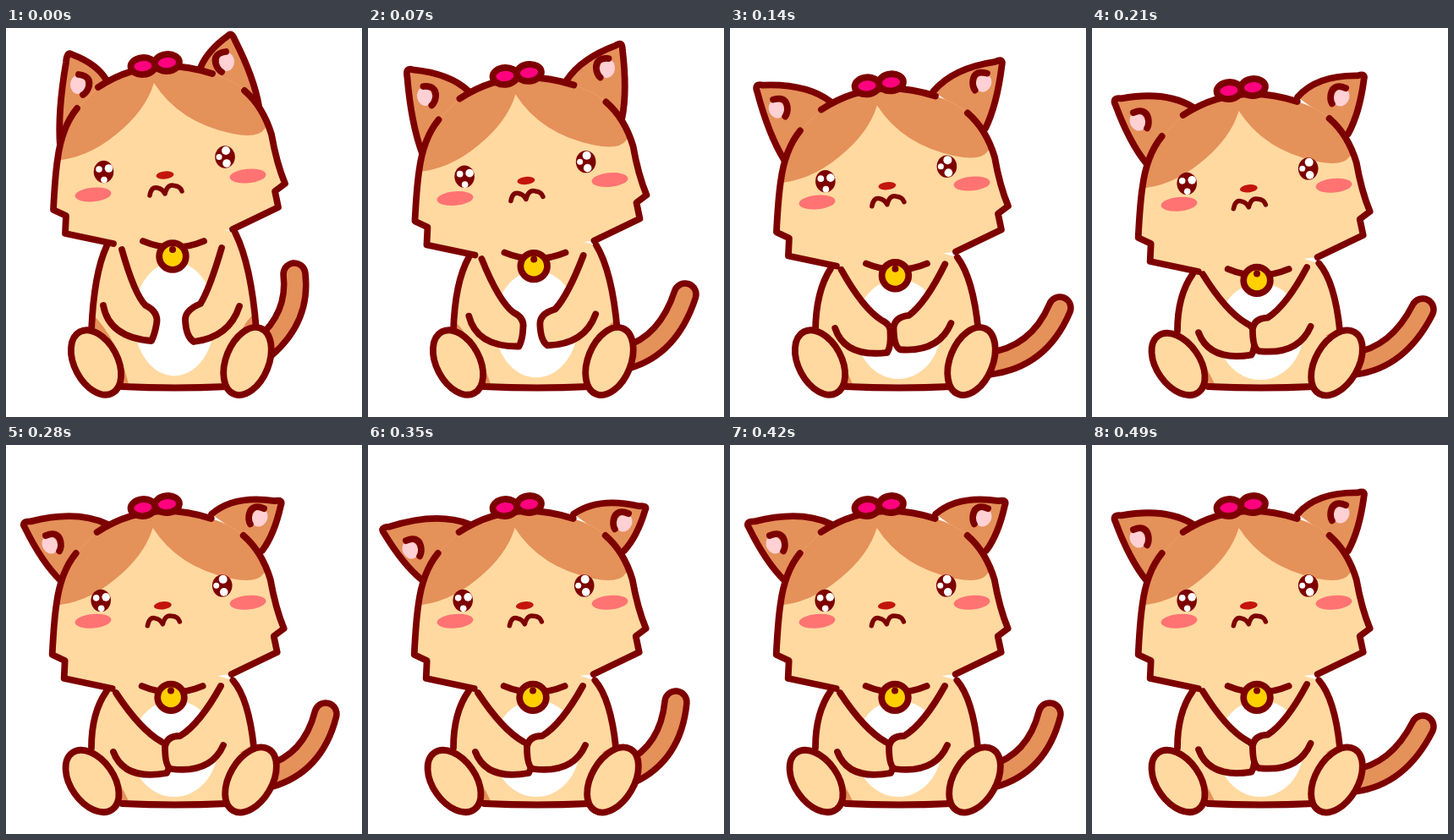
An HTML page with a canvas that plays this animation: 421 by 460 pixels, repeating every 560 ms.

```html
<!DOCTYPE html>
<html lang="en">
<head>
<meta charset="utf-8">
<title>Shy kitten</title>
<style>
  html, body { margin: 0; width: 100%; height: 100%; overflow: hidden; background: #fff; }
  canvas { display: block; }
</style>
</head>
<body>
<canvas id="stage" width="421" height="460"></canvas>
<script>
const ctx = document.getElementById('stage').getContext('2d');
const LINE = '#7d0000', SKIN = '#ffd9a0', BROWN = '#e5915a', WHITE = '#fff';
const BLUSH = '#ff7373', EAR_PINK = '#ffd0d4', BOW = '#ff007f', GOLD = '#ffd000', NOSE = '#c4140c';
const STEP = 70, PEN = 7.8;

// drop: head lowering, hug: arms closing, lean: feet turning outwards
const rest = { drop: 0, hug: 0, lean: 0, tail: [305, 378, 347, 342, 341, 291],
  earL: [72, 27], pinkL: [85, 67], earR: [267, 4], pinkR: [261, 40] };
const sink = { drop: 13.5, hug: .36, lean: 0, tail: [305, 390, 355, 376, 375, 315],
  earL: [44, 46], pinkL: [67, 81], earR: [301, 15], pinkR: [283, 48] };
const low = { drop: 26.5, hug: .77, lean: 0, tail: [305, 397, 365, 390, 390, 331],
  earL: [28, 65], pinkL: [55, 96], earR: [324, 35], pinkR: [300, 65] };
const curl = { drop: 33, hug: .92, lean: 1, tail: [310, 397, 362, 390, 391, 333],
  earL: [23, 82], pinkL: [54, 111], earR: [324, 53], pinkR: [295, 82] };
const hold = { drop: 33, hug: 1, lean: 1, tail: [310, 392, 363, 377, 378, 318],
  earL: [17, 90], pinkL: [52, 118], earR: [328, 64], pinkR: [300, 86] };
const tuck = { ...hold, tail: [310, 387, 358, 364, 364, 304],
  earL: [13, 97], pinkL: [50, 124], earR: [331, 71], pinkR: [303, 92] };
const poses = [rest, sink, low, curl, hold, tuck, hold, curl];

const arms = {
  left: {
    open: [137, 262, 152, 315, 165, 328, 181, 336, 178, 350, 176, 362, 172, 370, 122, 366, 115, 328],
    shut: [130, 293, 159, 337, 184, 351, 193, 355, 193, 363, 195, 381, 190, 388, 140, 397, 127, 363]
  },
  right: {
    open: [255, 260, 241, 308, 230, 326, 211, 334, 212, 346, 213, 365, 222, 371, 264, 366, 276, 329],
    shut: [254, 285, 229, 330, 206, 344, 190, 344, 188, 357, 188, 380, 195, 383, 242, 389, 257, 355]
  }
};

const headLeft = 'M84 95Q66 117 61 155Q58 175 56 215L71 222L70 243L127 255';
const headRight = 'M282 74Q304 93 314 126Q320 160 330 184L318 193L322 212L268 238';
const headTop = 'M109 70Q170 30 244 54';
const headFill = headLeft + 'L268 238L322 212L318 193L330 184Q320 160 314 126Q304 93 282 74Q267 61 244 54Q170 30 109 70Z';
const hair = 'M175 65Q165 98 130 126Q95 155 55 157V20H330V100L306 119Q298 131 268 125Q205 112 175 65Z';
const mouth = 'M170 198Q172 187 179 189Q185 190 188 196Q191 184 199 186.5Q206 187 208 193';

const mix = (a, b, t) => a + (b - a) * t;

function shape(d, fill, width = PEN) {
  const path = new Path2D(d);
  if (fill) { ctx.fillStyle = fill; ctx.fill(path); }
  if (width) { ctx.lineWidth = width; ctx.strokeStyle = LINE; ctx.stroke(path); }
}

function oval(x, y, rx, ry, fill, width = 0, degrees = 0) {
  ctx.beginPath();
  ctx.ellipse(x, y, rx, ry, degrees * Math.PI / 180, 0, 2 * Math.PI);
  ctx.fillStyle = fill;
  ctx.fill();
  if (width) { ctx.lineWidth = width; ctx.strokeStyle = LINE; ctx.stroke(); }
}

function shifted(x, y, draw) {
  ctx.save();
  ctx.translate(x, y);
  draw();
  ctx.restore();
}

function drawTail([x, y, cx, cy, tx, ty]) {
  const path = new Path2D(`M${x} ${y}Q${cx} ${cy} ${tx} ${ty}`);
  for (const [width, color] of [[33.5, LINE], [18.5, BROWN]]) {
    ctx.lineWidth = width;
    ctx.strokeStyle = color;
    ctx.stroke(path);
  }
}

// Control point at share t of the edge, pushed outwards by k
function bulge([x1, y1], [x2, y2], k, t) {
  const dx = x2 - x1, dy = y2 - y1, len = Math.hypot(dx, dy);
  return [mix(x1, x2, t) + dy / len * k, mix(y1, y2, t) - dx / len * k];
}

function drawEar(from, tip, to, k1, k2) {
  const near = p => tip.map((v, i) => mix(v, p[i], .12));
  const a = near(from), b = near(to);
  shape(`M${from}Q${bulge(from, a, k1, .4)} ${a}Q${tip} ${b}Q${bulge(b, to, k2, .6)} ${to}`, BROWN);
}

function drawInnerEar([x, y], side, turn) {
  shifted(x, y, () => {
    ctx.scale(side, 1);
    ctx.rotate(-turn);
    oval(0, 0, 9, 11, EAR_PINK);
    shape('M1 -12Q16 -10 13 2Q11 9 6 12', null);
  });
}

function drawArm({ open, shut }, hug) {
  const p = open.map((v, i) => mix(v, shut[i], hug));
  let d = `M${p[0]} ${p[1]}`;
  for (let i = 2; i < p.length; i += 4) d += `Q${p.slice(i, i + 4)}`;
  shape(d, SKIN);
}

function drawBody({ drop: d, hug, lean }) {
  const t = d / 33;
  const left = `M119 ${258 + d}Q${mix(104, 101, t)} ${290 + d * .8} 101 358`;
  const right = `L${mix(296, 293, t)} 357Q${mix(290, 287, t)} ${280 + d * .6} ${271 - d * .08} ${242 + d * 1.1}`;
  shape(`${left}L110 424H285${right}L200 ${225 + d}Z`, SKIN, 0);
  shape(`M102 ${338 + 20 * t}Q${132 - 6 * t} ${368 + 12 * t} 145 421H105Z`, BROWN, 0);
  shape(`M294 ${338 + 15 * t}Q283 ${345 + 15 * t} 276 364H296Z`, BROWN, 0);
  oval(199, mix(344, 359, t), mix(48, 51, t), mix(67.5, 57, t), WHITE);
  shape(left);
  shape(right.replace('L', 'M'));
  shape('M137 424Q200 427 262 424');
  drawArm(arms.left, hug);
  drawArm(arms.right, hug);
  oval(mix(106.5, 102, lean), mix(395.5, 397.5, lean), 25.5, 41, SKIN, PEN, mix(-28, -35, lean));
  oval(mix(285.5, 289.5, lean), mix(394, 396, lean), 25.3, 42, SKIN, PEN, mix(22, 30, lean));
}

function drawEye(x, y, shines) {
  oval(x, y, 11.8, 13.2, LINE);
  for (const [dx, dy, r] of shines) oval(x + dx, y + dy, r, r, WHITE);
}

function drawHead(d) {
  shifted(-d * .04, d, () => {
    shape(headFill, SKIN, 0);
    ctx.save();
    ctx.clip(new Path2D(headFill));
    shape(hair, BROWN, 0);
    ctx.restore();
    shape(headLeft);
    shape(headRight);
    shape(headTop);
    shape('M162 252Q198 267 234 252');
  });
  shifted(0, d * .88, () => {
    oval(162, 45, 14.5, 10, BOW, PEN, -5);
    oval(190.5, 41, 14.5, 10, BOW, PEN, -5);
  });
  shifted(-d * .1, d * .42, () => {
    drawEye(115.5, 170, [[-5.5, -3, 3.8], [6, -4, 4.8], [.5, 9.5, 3.8]]);
    drawEye(259, 152.5, [[1, -7.5, 5], [-7, 0, 3.5], [2, 7.5, 4.8]]);
  });
  shifted(0, d * .34, () => {
    oval(103, 197, 21.5, 8.3, BLUSH, 0, -5);
    oval(286, 175, 21.5, 8.3, BLUSH, 0, -5);
  });
  shifted(-d * .08, d * .48, () => {
    oval(188, 174, 10.5, 4.6, NOSE, 0, -6);
    shape(mouth, null, 5.5);
  });
  shifted(-d * .06, d * .86, () => {
    oval(197, 270, 15.8, 15.8, GOLD, PEN);
    oval(197, 262, 4, 4, LINE);
  });
}

function drawCat(pose) {
  const d = pose.drop, turn = d / 33 * .52;
  drawTail(pose.tail);
  drawEar([64, 140 + d * .6], pose.earL, [119, 62 + d * .95], 6, 9 + d * .2);
  drawEar([230 + d * .4, 47 + d * 1.05], pose.earR, [299 + d * .12, 92 + d], 7 + d * .3, 6);
  drawInnerEar(pose.pinkL, 1, turn);
  drawInnerEar(pose.pinkR, -1, turn);
  drawBody(pose);
  drawHead(d);
}

ctx.lineCap = ctx.lineJoin = 'round';
function tick() {
  const step = Math.floor(performance.now() / STEP) % poses.length;
  ctx.fillStyle = WHITE;
  ctx.fillRect(0, 0, 421, 460);
  drawCat(poses[step]);
  requestAnimationFrame(tick);
}
tick();
</script>
</body>
</html>
```
